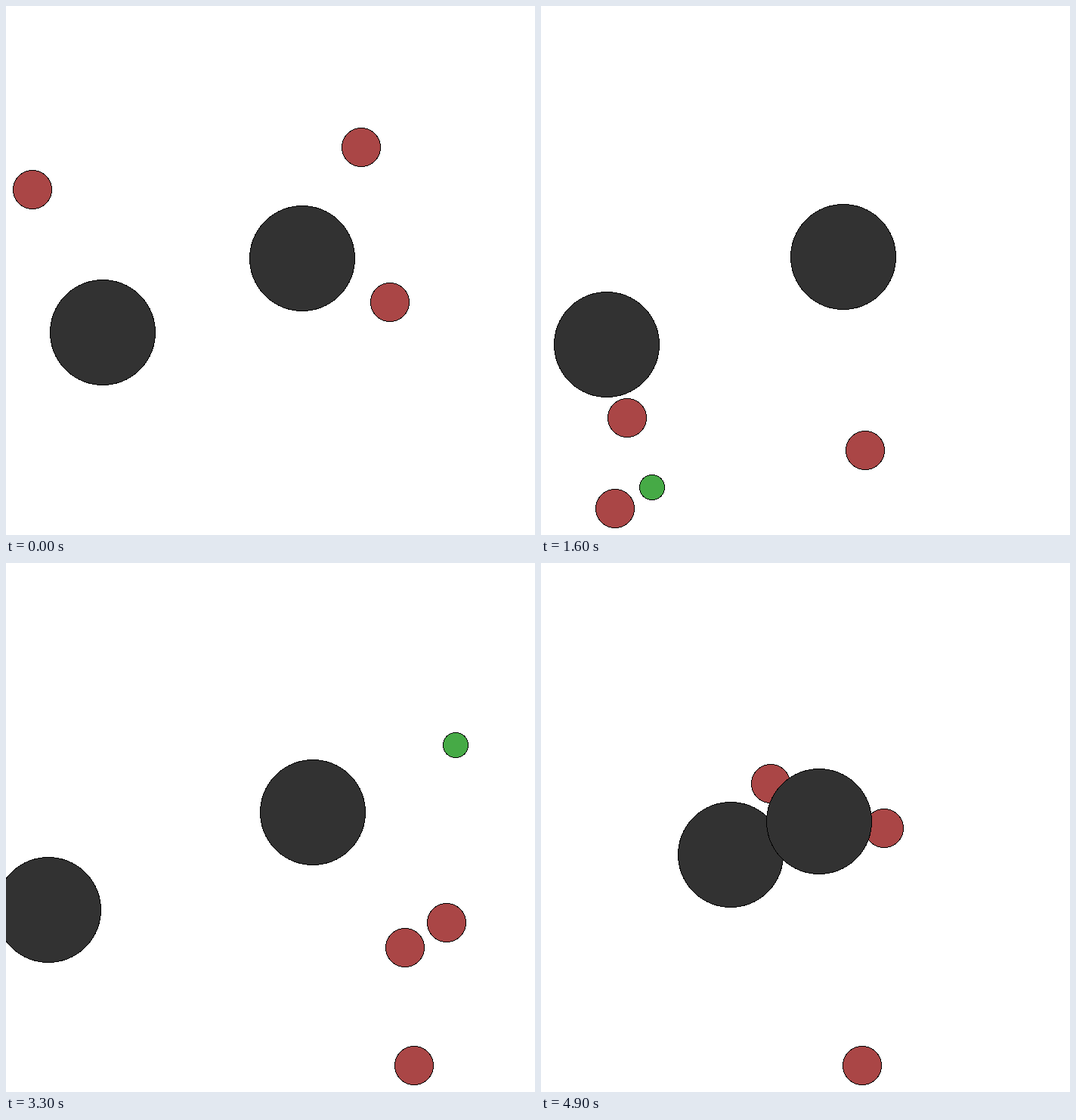
An HTML page with a canvas for the animation above (5000 ms loop, 700 by 700 pixels).

```html
<!DOCTYPE html>
<html lang="en">
<head>
<meta charset="utf-8">
<title>Chasing circles</title>
<style>
  html, body { margin: 0; width: 100%; height: 100%; overflow: hidden; background: #fff; }
  canvas { display: block; width: 700px; height: 700px; }
</style>
</head>
<body>
<canvas id="stage" width="700" height="700"></canvas>
<script>
const ctx = document.getElementById('stage').getContext('2d');
const LOOP = 5000, STEP = 100;
const GRAVITY = 6.88, FLOOR = 665, DRAG = 0.138;
const RED = '#aa4646', DARK = '#323232', GREEN = '#46aa46';

const key = (t, x, y) => ({ t, x, y });
const fall = (y, n) => y + GRAVITY / 2 * n * n;

// A chaser drops freely, then curves through one point per turn.
const TURNS = [7, 12, 16, 24, 33, 41, 49];
function chaser(x, y, drop, ...points) {
  const path = points.map(([px, py], i) => key(TURNS[i], px, py));
  path.unshift(key(drop, x, fall(y, drop)));
  return n => n < drop ? { x, y: fall(y, n) } : along(path, n);
}

const chasers = [
  chaser(35, 243, 6, [35, 412], [58, 608], [98, 665], [250, 651], [528, 509], [429, 346], [454, 351]),
  chaser(470, 187, 6, [470, 355], [506, 540], [429, 588], [386, 665], [540, 665], [467, 665], [425, 665]),
  chaser(508, 392, 3, [425, 479], [235, 532], [114, 545], [279, 595], [583, 476], [428, 275], [304, 292])
];

const prey = [
  key(3, 190, 620), key(7, 181, 613), key(16, 147, 637), key(24, 497, 631), key(31, 620, 330),
  key(33, 595, 241), key(37, 470, 205), key(41, 335, 226), key(43, 268, 262)
];

// Smooth curve through unevenly timed keys.
function along(path, n) {
  const last = path.length - 1;
  if (n >= path[last].t) return path[last];
  const i = path.findIndex(k => k.t > n) - 1;
  const a = path[i], b = path[i + 1];
  const before = path[Math.max(i - 1, 0)], after = path[Math.min(i + 2, last)];
  const h = b.t - a.t, u = (n - a.t) / h;
  const curve = c => {
    const m0 = (b[c] - before[c]) / (b.t - before.t) * h;
    const m1 = (after[c] - a[c]) / (after.t - a.t) * h;
    const d = b[c] - a[c];
    return a[c] + u * (m0 + u * (3 * d - 2 * m0 - m1 + u * (m0 + m1 - 2 * d)));
  };
  return { x: curve('x'), y: curve('y') };
}

// The dark discs slide along their common line; each push dies out by drag.
const push = (n, t, reach) => n > t ? reach * (1 - Math.exp(-DRAG * (n - t))) : 0;
const slide = n => push(n, 11, -82) + push(n, 18, 42) + push(n, 27, -54) + push(n, 33.66, 244);

// Hard-edged disc built from pixel rows.
function rows(x, y, r) {
  for (let dy = -r; dy < r; dy++) {
    const w = Math.round(Math.sqrt(r * r - (dy + 0.5) ** 2));
    ctx.fillRect(x - w, y + dy, 2 * w, 1);
  }
}

function disc({ x, y }, r, fill) {
  x = Math.round(x);
  y = Math.round(y);
  ctx.fillStyle = '#000';
  rows(x, y, r);
  ctx.fillStyle = fill;
  rows(x, y, r - 1);
}

function draw(n) {
  ctx.fillStyle = '#fff';
  ctx.fillRect(0, 0, 700, 700);

  for (const at of chasers) {
    const { x, y } = at(n);
    disc({ x, y: Math.min(y, FLOOR) }, 26, RED);
  }
  if (n >= prey[0].t && n <= prey[prey.length - 1].t) disc(along(prey, n), 17, GREEN);

  const s = slide(n);
  disc({ x: 128 + s, y: 432.2 - 0.375 * s }, 70, DARK);
  disc({ x: 392 - 0.195 * s, y: 334.45 + 0.064 * s }, 70, DARK);
}

const start = performance.now();
function tick() {
  draw(Math.floor((performance.now() - start) % LOOP / STEP));
  requestAnimationFrame(tick);
}
tick();
</script>
</body>
</html>
```
